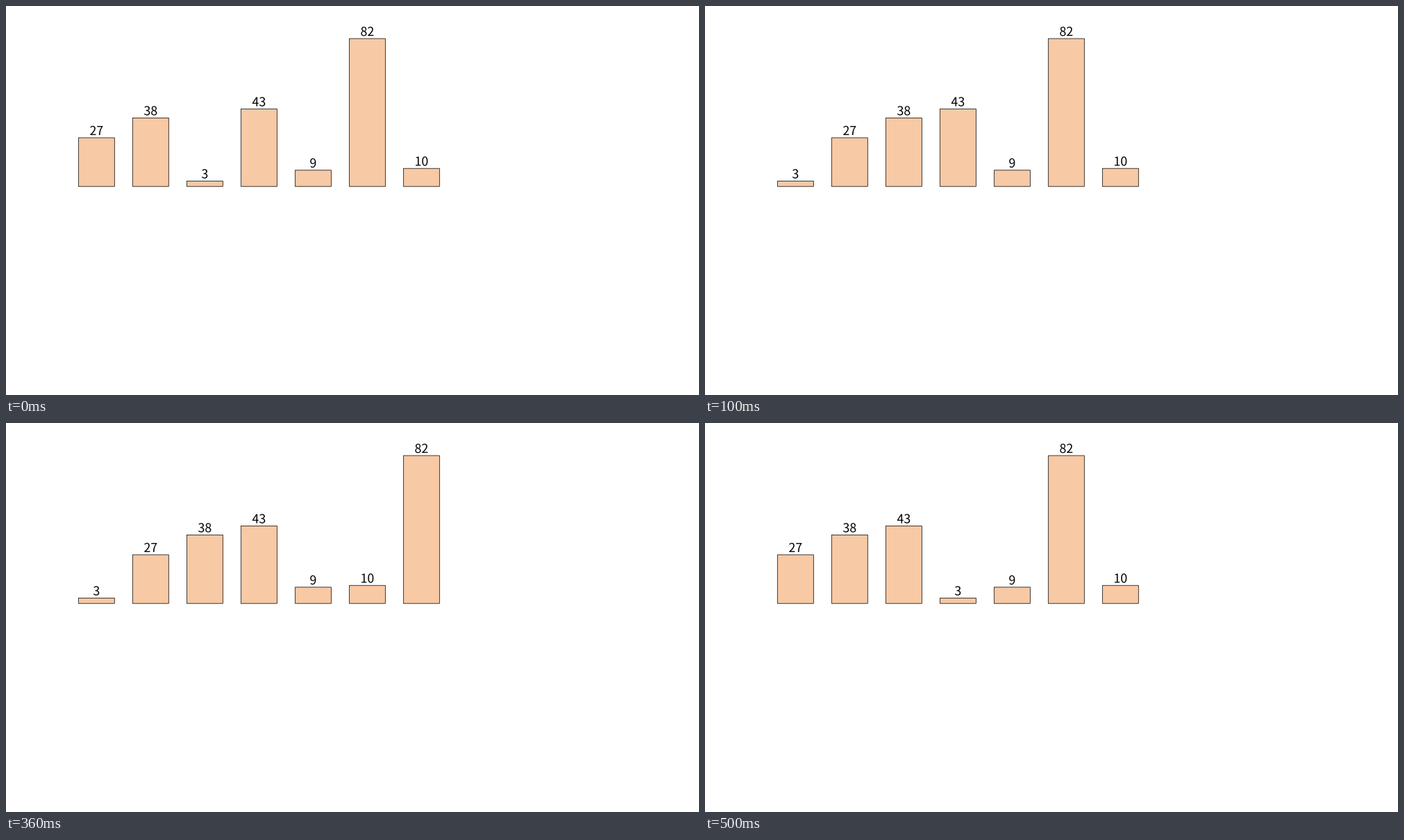
Animation of 998 by 561 pixels, one loop 600 ms. Source, as a matplotlib script:

```python
import matplotlib.pyplot as plt
from matplotlib.animation import FuncAnimation
from matplotlib.patches import PathPatch, Rectangle
from matplotlib.textpath import TextPath

W, H, DPI = 998, 561, 64
PX = 72 / DPI  # points per pixel
LEFT, PITCH, BAR_W = 104.3, 78, 52
BASE, UNIT = H - 260.2, 2.6
FONT, SIZE = {"family": "Noto Sans CJK JP"}, 17.8
DIGIT_W, GAP = 0.555 * SIZE, 3.9
VALUES = [27, 38, 43, 3, 9, 82, 10]


def merge_steps(a, lo, hi):
    """Yield the whole list after every merge of a recursive merge sort."""
    if hi - lo < 2:
        return
    mid = (lo + hi + 1) // 2
    yield from merge_steps(a, lo, mid)
    yield from merge_steps(a, mid, hi)
    a[lo:hi] = sorted(a[lo:hi])
    yield list(a)


def number_path(cx, y, value):
    """Outline of a number centred on cx, free of pixel rounding."""
    text = str(value)
    return TextPath((cx - len(text) * DIGIT_W / 2, y), text, size=SIZE, prop=FONT)


steps = list(merge_steps(list(VALUES), 0, len(VALUES)))

fig = plt.figure(figsize=(W / DPI, H / DPI), dpi=DPI, facecolor="white")
ax = fig.add_axes([0, 0, 1, 1])
ax.set_xlim(0, W)
ax.set_ylim(0, H)
ax.axis("off")

bars, labels = [], []
for i, value in enumerate(VALUES):
    x = LEFT + i * PITCH
    bars.append(ax.add_patch(Rectangle(
        (x, BASE), BAR_W, 0, facecolor="#f7c9a5", edgecolor="black",
        linewidth=0.75 * PX, snap=False)))
    labels.append(ax.add_patch(PathPatch(
        number_path(x + BAR_W / 2, BASE, value), facecolor="black",
        linewidth=0, snap=False)))


def draw(frame):
    # the loop opens on the second merge
    for bar, label, value in zip(bars, labels, steps[(frame + 1) % len(steps)]):
        height = UNIT * value
        bar.set_height(height)
        label.set_path(number_path(bar.get_x() + BAR_W / 2,
                                   BASE + height + GAP, value))
    return bars + labels


anim = FuncAnimation(fig, draw, frames=len(steps), interval=100,
                     repeat=True, repeat_delay=0)
plt.show()
```
